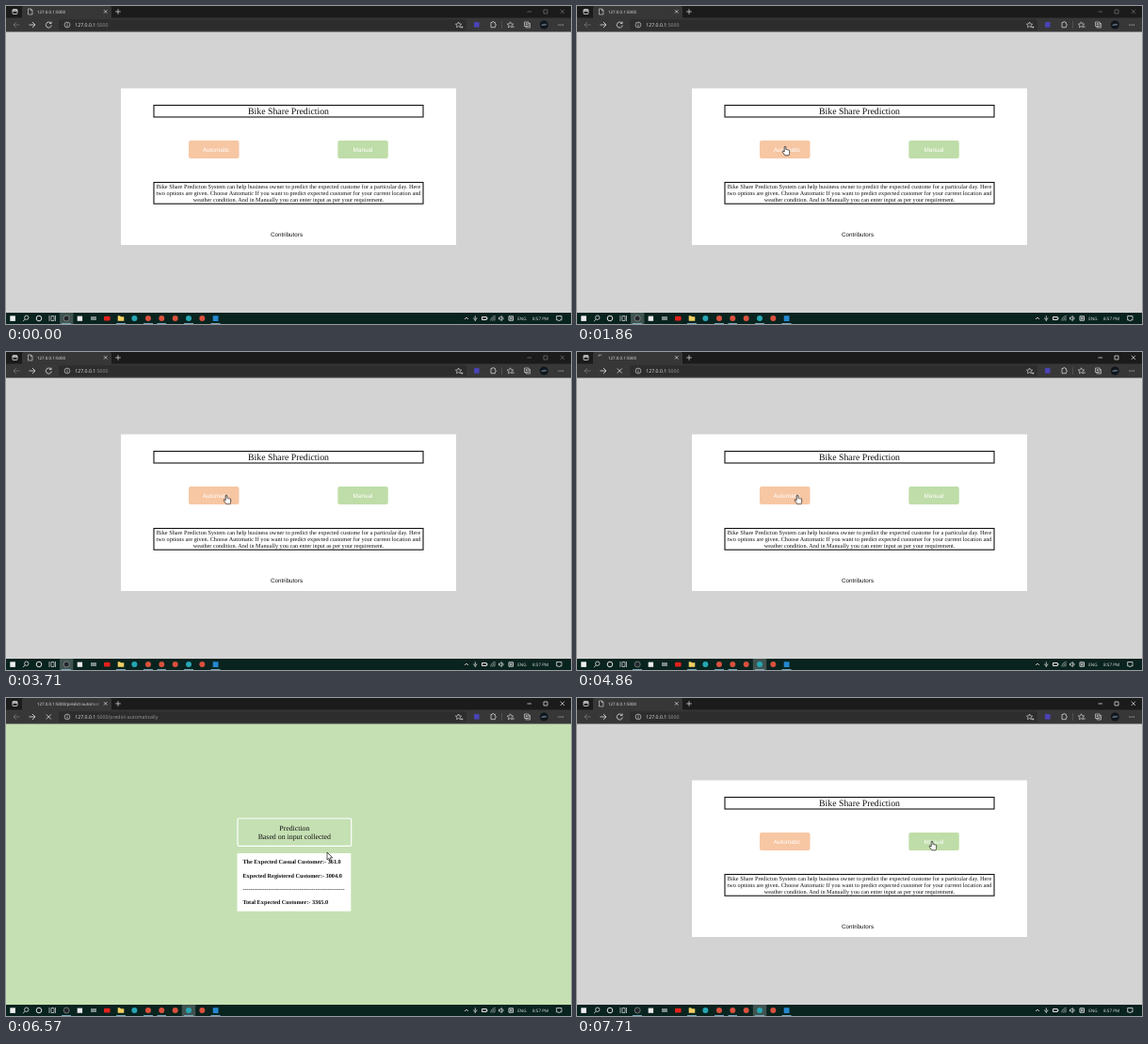
Animation, 600 px wide and 338 px high, one loop 8 s. Source, as an HTML page:

```html
<!DOCTYPE html>
<html lang="en">
<head>
<meta charset="utf-8">
<title>Bike Share Prediction</title>
<style>
html, body { margin: 0; height: 100%; overflow: hidden; background: #d3d3d3; }
svg { display: block; width: 100vw; height: 100vh; }
text { text-rendering: geometricPrecision; }
.ui { font-family: "Open Sans", "Noto Sans", sans-serif; fill: #e8e8e8; }
.serif { font-family: "Liberation Serif", "Times New Roman", serif; fill: #111; }
.sans { font: 6.4px "Liberation Sans", Arial, sans-serif; fill: #fff; }
.mid { text-anchor: middle; }
.bold { font-size: 6.25px; font-weight: bold; }
.line { fill: none; stroke: #e4e4e4; stroke-width: .8; }
.dim { opacity: .35; }

/* states of the browser over one 8 s cycle */
.home, .pred, .idle, .load, .can-back, .no-back, .blur, .focus, .arrow, .hand, .ctl {
  animation: 8s step-end infinite;
}
.home { animation-name: home; }
.pred { animation-name: pred; }
.idle { animation-name: idle; }
.load { animation-name: load; }
.can-back { animation-name: can-back; }
.no-back { animation-name: no-back; }
.blur { animation-name: blur; }
.focus { animation-name: focus; }
.arrow { animation-name: arrow; }
.hand { animation-name: hand; }
.ctl { animation-name: ctl; }
@keyframes home { 0%, 85.75% { opacity: 1 } 62.5% { opacity: 0 } }
@keyframes pred { 0%, 85.75% { opacity: 0 } 62.5% { opacity: 1 } }
@keyframes idle { 0%, 62.5%, 85.75% { opacity: 1 } 50%, 82.125% { opacity: 0 } }
@keyframes load { 0%, 62.5%, 85.75% { opacity: 0 } 50%, 82.125% { opacity: 1 } }
@keyframes can-back { 0%, 82.125% { opacity: 0 } 62.5% { opacity: 1 } }
@keyframes no-back { 0%, 82.125% { opacity: 1 } 62.5% { opacity: 0 } }
@keyframes blur { 0% { opacity: 1 } 50% { opacity: 0 } }
@keyframes focus { 0% { opacity: 0 } 50% { opacity: 1 } }
@keyframes ctl { 0% { stroke: #777 } 50% { stroke: #eee } }

/* pointer */
@keyframes arrow { 0%, 14.25%, 92.8% { opacity: 0 } 5.375%, 64.25% { opacity: 1 } }
@keyframes hand { 0%, 64.25% { opacity: 0 } 14.25%, 92.8% { opacity: 1 } }
.pointer { animation: move 8s linear infinite; }
@keyframes move {
  0%, 5.375% { transform: translate(150px, 330px); animation-timing-function: steps(5) }
  14.25%, 28.625% { transform: translate(221px, 149px); animation-timing-function: steps(8) }
  42.875%, 62.5% { transform: translate(234px, 151.7px); animation-timing-function: steps(7) }
  75%, 85.75% { transform: translate(341px, 164px); animation-timing-function: steps(5) }
  94.625%, 100% { transform: translate(377px, 152px) }
}
.spin { animation: spin .8s linear infinite; transform-origin: 25px 6px; }
@keyframes spin { to { transform: rotate(360deg) } }
</style>
</head>
<body>
<svg viewBox="0 0 600 338">
  <defs>
    <linearGradient id="fade">
      <stop offset="0" stop-color="#373737" stop-opacity="0"/>
      <stop offset="1" stop-color="#373737"/>
    </linearGradient>
    <path id="left" d="M14.5 20H8M11 17L8 20L11 23"/>
    <path id="right" d="M24.5 20H31M28 17L31 20L28 23"/>
  </defs>

  <!-- start page -->
  <rect y="27" width="600" height="299" fill="#d3d3d3"/>
  <rect x="122" y="87.5" width="356" height="166.5" fill="#fff"/>
  <g fill="none" stroke="#111" stroke-width="1.1">
    <rect x="157" y="105.5" width="286" height="12.5"/>
    <rect x="157" y="187.5" width="286" height="22.7"/>
  </g>
  <text class="serif mid" x="300" y="115.2" font-size="9.8">Bike Share Prediction</text>
  <rect x="194" y="143" width="53.5" height="19" rx="2" fill="#f7c6a3"/>
  <rect x="352.3" y="143" width="53.5" height="19" rx="2" fill="#bfdda8"/>
  <text class="sans mid" x="223" y="154.7">Automatic</text>
  <text class="sans mid" x="379" y="154.7">Manual</text>
  <g class="serif mid" font-size="6.25">
    <text x="300" y="193.6">Bike Share Predicton System can help business owner to predict the expected custome for a particular day. Here</text>
    <text x="300" y="200.8">two options are given. Choose Automatic If you want to predict expected customer for your current location and</text>
    <text x="300" y="208">weather condition. And in Manually you can enter input as per your requirement.</text>
  </g>
  <text class="sans mid" x="298" y="244.5" style="font-size:6.25px;fill:#111">Contributors</text>

  <!-- result page -->
  <g class="pred">
    <rect y="27" width="600" height="299" fill="#c5e0b3"/>
    <rect x="246" y="128" width="120.7" height="29.3" rx="1.5" fill="none" stroke="#fff" stroke-width="1.2"/>
    <g class="serif mid" font-size="7.85">
      <text x="306.3" y="140.7">Prediction</text>
      <text x="306.3" y="149.5">Based on input collected</text>
    </g>
    <rect x="245.5" y="165" width="120.8" height="61.7" fill="#fff"/>
    <g class="serif bold">
      <text x="251.4" y="176.2">The Expected Casual Customer:- 361.0</text>
      <text x="251.4" y="190.6">Expected Registered Customer:- 3004.0</text>
      <text x="251.4" y="205.2">----------------------------------------------------</text>
      <text x="251.4" y="219.4">Total Expected Customer:- 3365.0</text>
    </g>
  </g>

  <!-- tab strip -->
  <rect width="600" height="13" fill="#1b1b1b"/>
  <path d="M17 13V2Q17 0 19 0H110Q112 0 112 2V13Z" fill="#373737"/>
  <g class="line">
    <rect x="7" y="3.5" width="5" height="5" rx=".8"/>
    <path d="M7 5H12" stroke-width="1.4"/>
    <path d="M104 4.2L107.4 7.6M107.4 4.2L104 7.6M119 3.2V8.8M116.2 6H121.8" stroke-width=".7"/>
    <path class="idle" d="M23.5 3H26.5L28 4.5V9H23.5ZM26.3 3V4.7H28" stroke-width=".6"/>
  </g>
  <g class="load"><g class="home">
    <path class="spin line" d="M22 6A3 3 0 0 1 25 3" stroke="#aaa" opacity=".7"/>
  </g></g>
  <g class="ui" font-size="4.45">
    <text class="home" x="33" y="7.7">127.0.0.1:5000</text>
    <text class="pred" x="33" y="7.7">127.0.0.1:5000/predict-automati</text>
  </g>
  <rect x="91" y="2" width="11" height="8" fill="url(#fade)"/>
  <path class="ctl" d="M553.5 6H558M571 4H575V8H571ZM588.7 3.7L593 8M593 3.7L588.7 8" fill="none" stroke-width=".7"/>

  <!-- toolbar -->
  <rect y="12.5" width="600" height="15" fill="#373737"/>
  <rect x="56" y="14.3" width="433" height="11.4" rx="2" fill="#2d2d2d"/>
  <g class="line">
    <g class="no-back"><use href="#left" class="dim"/><use href="#right"/></g>
    <g class="can-back"><use href="#left"/><use href="#right" class="dim"/></g>
    <path class="idle" d="M47.7 18.2A3 3 0 1 0 48.3 20.6M48.1 16.6V18.6H46"/>
    <path class="load" d="M42.8 17.5L47.8 22.5M47.8 17.5L42.8 22.5"/>
    <circle cx="65" cy="20" r="2.9" stroke-width=".6"/>
    <path d="M65 19.6V21.7M65 18.2V18.9" stroke-width=".7"/>
    <path d="M480.5 17L481.5 19L483.7 19.2L482 20.6L482.5 22.7L480.5 21.6L478.5 22.7L479 20.6L477.4 19.2L479.6 19ZM483 22.5H485.4M484.2 21.3V23.7" stroke-width=".6"/>
    <path d="M515 17.5H516.4A1 1 0 0 1 518.4 17.5H519.4V19.2A1 1 0 0 1 519.4 21.2V22.7H515Z" stroke-width=".7"/>
    <path d="M526.5 16V24" stroke="#666" stroke-width=".5"/>
    <path d="M535.5 16.8L536.5 18.9L538.8 19.1L537 20.6L537.6 22.8L535.5 21.7L533.4 22.8L534 20.6L532.2 19.1L534.5 18.9ZM538 22H540" stroke-width=".6"/>
    <path d="M550.5 17H555V21.5H550.5ZM552 21.5V23H556.5V18.5H555M552.8 18V20.5M551.5 19.2H554" stroke-width=".6"/>
  </g>
  <rect x="497" y="17" width="5.6" height="5.8" rx="1" fill="#4a43b5"/>
  <circle cx="571.3" cy="20" r="4.5" fill="#10161d"/>
  <path d="M567.7 20.5Q571 17.5 574.8 19.5Q572 22 567.7 20.5" fill="#536270"/>
  <g fill="#e4e4e4"><circle cx="587" cy="20" r=".6"/><circle cx="589.2" cy="20" r=".6"/><circle cx="591.4" cy="20" r=".6"/></g>
  <text class="ui" x="73.3" y="21.9" font-size="5.2">127.0.0.1<tspan fill="#999">:5000</tspan></text>
  <text class="ui pred" x="108.3" y="21.9" font-size="5.2"><tspan fill="#999">/predict-automatically</tspan></text>

  <!-- taskbar -->
  <rect y="326" width="600" height="12" fill="#09231f"/>
  <rect class="blur" x="57" y="326" width="14.4" height="12" fill="#40534f"/>
  <rect class="focus" x="186.8" y="326" width="14.4" height="12" fill="#40534f"/>
  <path d="M117 337.5H127M146 337.5H156M160.5 337.5H170M189 337.5H199M217.5 337.5H227.5M59 337.5H69" stroke="#7fb0c4" stroke-width=".9"/>
  <rect x="4.3" y="329.3" width="5.6" height="5.6" fill="#eee"/>
  <g class="line">
    <circle cx="21.8" cy="331.2" r="2.2"/><path d="M20.2 332.9L18 335.2"/>
    <circle cx="35" cy="332" r="2.8" stroke-width="1"/>
    <path d="M46 329V335M48 329.5H51V334.5H48ZM52.5 329V335" stroke-width=".7"/>
  </g>
  <circle cx="64.2" cy="332" r="3" fill="#20262a" stroke="#aaa" stroke-width=".6"/>
  <rect x="75.7" y="329.6" width="5.4" height="5.2" fill="#ececec"/>
  <rect x="90" y="330" width="6" height="4" fill="#7d8b8a"/>
  <rect x="104" y="329.7" width="6.6" height="4.7" rx="1" fill="#e3211c"/>
  <path d="M118.7 329.3H121L122 330.2H125.3V334.8H118.7Z" fill="#f2cf63"/>
  <g>
    <circle cx="136.4" cy="332" r="3" fill="#27a6b4"/>
    <circle cx="151" cy="332" r="3" fill="#d9513d"/>
    <circle cx="165.3" cy="332" r="3" fill="#d9513d"/>
    <circle cx="179.7" cy="332" r="3" fill="#d9513d"/>
    <circle cx="194" cy="332" r="3" fill="#27a6b4"/>
    <circle cx="208.3" cy="332" r="3" fill="#d9513d"/>
  </g>
  <rect x="219.7" y="329.2" width="5.8" height="5.8" fill="#2588d0"/>
  <g class="line" stroke-width=".7">
    <path d="M487 333L489 331L491 333"/>
    <path d="M498.3 329.3V332.5M496.6 331.5Q496.6 333.3 498.3 333.3Q500 333.3 500 331.5M498.3 333.3V335"/>
    <path d="M505.5 330.5H510.3V333.5H505.5ZM511 331.3V332.7" stroke-width="1"/>
    <path d="M514.8 334.5A5 5 0 0 1 519.8 329.5M516.6 334.5A3 3 0 0 1 519.8 331.4M518.3 334.5A1.5 1.5 0 0 1 519.8 333" opacity=".7"/>
    <path d="M523.5 331H524.7L526.3 329.5V334.5L524.7 333H523.5ZM527.6 330.5Q528.6 332 527.6 333.5"/>
    <path d="M534 329.8H538.5V334.2H534ZM536.2 330.5V333.5M535 332H537.5" stroke-width=".9"/>
    <path d="M584.7 329.5H590V333.8H588.2L587.3 335L586.4 333.8H584.7Z"/>
  </g>
  <g class="ui" font-size="4.6">
    <text x="543.2" y="333.8">ENG</text>
    <text x="559" y="333.8">8:57 PM</text>
  </g>

  <g class="pointer" stroke="#111" stroke-width=".7" stroke-linejoin="round" fill="#fff">
    <path class="arrow" d="M0 0V8L1.9 6.3L3.2 9.2L4.5 8.6L3.2 5.8H5.7Z"/>
    <path class="hand" d="M-.8 .8Q0 -.5 .9 .8V3.6Q1.8 3 2.4 3.9Q3.2 3.3 3.7 4.2Q4.7 3.9 4.7 5V7.2Q4.6 8.6 3.9 9.8H-.1Q-1.2 8.2 -2.8 6.2Q-3.2 5.2 -2.2 5L-.8 6Z"/>
  </g>
</svg>
</body>
</html>
```
